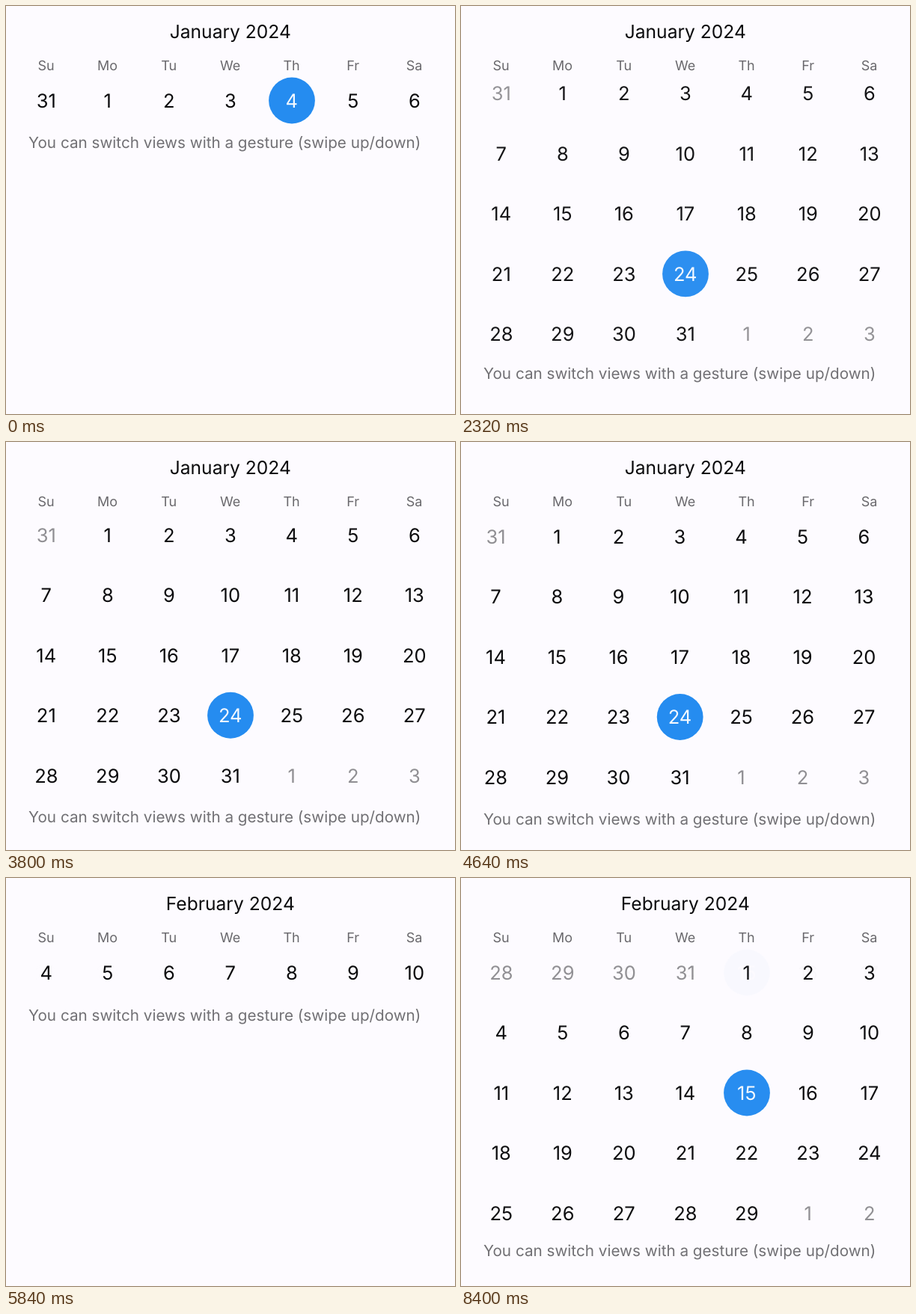
These frames come from a looping animation (600 by 546 pixels, 8520 ms). An HTML page:

```html
<!DOCTYPE html>
<html lang="en">
<head>
<meta charset="utf-8">
<title>Calendar views</title>
<style>
  html, body { margin: 0; width: 100%; height: 100%; overflow: hidden; background: #fdfbff; }
  svg { display: block; width: 600px; height: 546px; font-family: Inter, "Liberation Sans", sans-serif; }
  text { text-anchor: middle; fill: #0b0b0d; text-rendering: geometricPrecision; }
  .title { font-size: 24.6px; }
  .weekday { font-size: 18px; fill: #69686c; }
  .note { font-size: 20.68px; fill: #717074; text-anchor: start; }
  .day { font-size: 25.5px; }
  .outside text { fill: #908f93; }
  circle { fill: #258cf0; visibility: hidden; }
  .selected circle { visibility: visible; }
  .selected text { fill: #f4f9ff; }
</style>
</head>
<body>
<svg id="stage" viewBox="0 0 600 546">
  <clipPath id="window"><rect id="view" y="86.5" width="600" height="80.5"/></clipPath>
  <text id="title" class="title" x="299.8" y="43"></text>
  <g id="names"></g>
  <g clip-path="url(#window)">
    <g id="months"></g>
    <g id="weeks"></g>
  </g>
  <text id="note" class="note" x="30" y="189.5">You can switch views with a gesture (swipe up/down)</text>
</svg>
<script>
const LOOP = 8520, STEP = 40, WIDTH = 600;
const TOP = 126.5, ROW = 80.5, LEFT = 53.8, COLUMN = 82;
const $ = id => document.getElementById(id);

function add(parent, tag, attrs, text = '') {
  const el = document.createElementNS('http://www.w3.org/2000/svg', tag);
  for (const key in attrs) el.setAttribute(key, attrs[key]);
  el.textContent = text;
  return parent.appendChild(el);
}

// Days are counted from 31 December 2023 = 0.
const monthOf = n => n < 1 ? 0 : n <= 31 ? 1 : n <= 60 ? 2 : 3;
const dayOf = n => n - [-31, 0, 31, 60][monthOf(n)];

const cells = [];
function addDays(parent, first, count, month) {
  const page = add(parent, 'g', {});
  for (let i = 0; i < count; i++) {
    const n = first + i;
    const x = LEFT + COLUMN * (i % 7), y = TOP + ROW * Math.floor(i / 7);
    const outside = month !== undefined && monthOf(n) !== month;
    const el = add(page, 'g', outside ? { class: 'outside' } : {});
    add(el, 'circle', { cx: x + 0.2, cy: y, r: 30.9 });
    add(el, 'text', { class: 'day', x, y: y + 9.3 }, dayOf(n));
    cells.push({ n, el });
  }
  return page;
}

['Su', 'Mo', 'Tu', 'We', 'Th', 'Fr', 'Sa'].forEach((name, i) =>
  add($('names'), 'text', { class: 'weekday', x: LEFT - 0.2 + COLUMN * i, y: 85.5 }, name));

const months = [addDays($('months'), 0, 35, 1), addDays($('months'), 28, 35, 2)];
const weeks = [0, 21, 35, 42].map(first => addDays($('weeks'), first, 7));

// Critically damped spring: the share of the way still to go.
function rest(ms, speed) {
  const k = speed * ms / 1000;
  return (1 + k) * Math.exp(-k);
}

// A drag covering part of the way, then a spring to the end.
function move(t, start, release, dragged, speed) {
  if (t < start) return 0;
  if (t < release) return dragged * ((t - start) / (release - start)) ** 1.5;
  const p = 1 - (1 - dragged) * rest(t - release, speed);
  return p > 0.999 ? 1 : p;
}

const openness = t =>
  move(t, 380, 600, 0.35, 22.4) - move(t, 2260, 2540, 0.4, 22.4) +
  move(t, 3500, 3500, 0, 22.4) - move(t, 5500, 5500, 0, 22.4) +
  move(t, 8100, 8100, 0, 20.2);

// A first swipe falls back, the second one turns the page.
function monthShift(t) {
  if (t < 4240) return -130 * move(t, 3960, 4240, 1, 1);
  if (t < 4660) return -130 * rest(t - 4240, 11.5);
  return -7 - (WIDTH - 7) * move(t, 4660, 4780, 0.3, 18);
}

const weekShift = t => -WIDTH * move(t, 6300, 6520, 0.28, 14);

function place(el, x, y) {
  el.setAttribute('transform', `translate(${x.toFixed(2)} ${y.toFixed(2)})`);
}

let chosen;
function select(n) {
  if (n === chosen) return;
  chosen = n;
  for (const cell of cells) cell.el.classList.toggle('selected', cell.n === n);
}

function draw(t) {
  const open = openness(t), shift = monthShift(t), slide = weekShift(t);
  const february = shift < -WIDTH / 2;
  const row = t >= 1520 && !february ? 3 : 0;

  select(t < 1520 ? 4 : t < 7640 ? 24 : 46);
  $('title').textContent = (february ? 'February' : 'January') + ' 2024';
  $('view').setAttribute('height', ROW * (1 + 4 * open));
  place($('note'), 0, 4 * ROW * open);

  $('months').setAttribute('opacity', open);
  months.forEach((page, i) => place(page, shift + WIDTH * i, -ROW * row * (1 - open)));

  $('weeks').setAttribute('opacity', 1 - open);
  const offsets = february ? [null, null, slide, slide + WIDTH]
    : t < 1520 ? [0, null, null, null] : [null, 0, null, null];
  weeks.forEach((page, i) => {
    page.setAttribute('display', offsets[i] === null ? 'none' : 'inline');
    place(page, offsets[i] || 0, ROW * row * open);
  });
}

const begin = performance.now();
function tick() {
  const t = (performance.now() - begin) % LOOP;
  draw(Math.floor(t / STEP) * STEP);
  requestAnimationFrame(tick);
}
tick();
</script>
</body>
</html>
```
